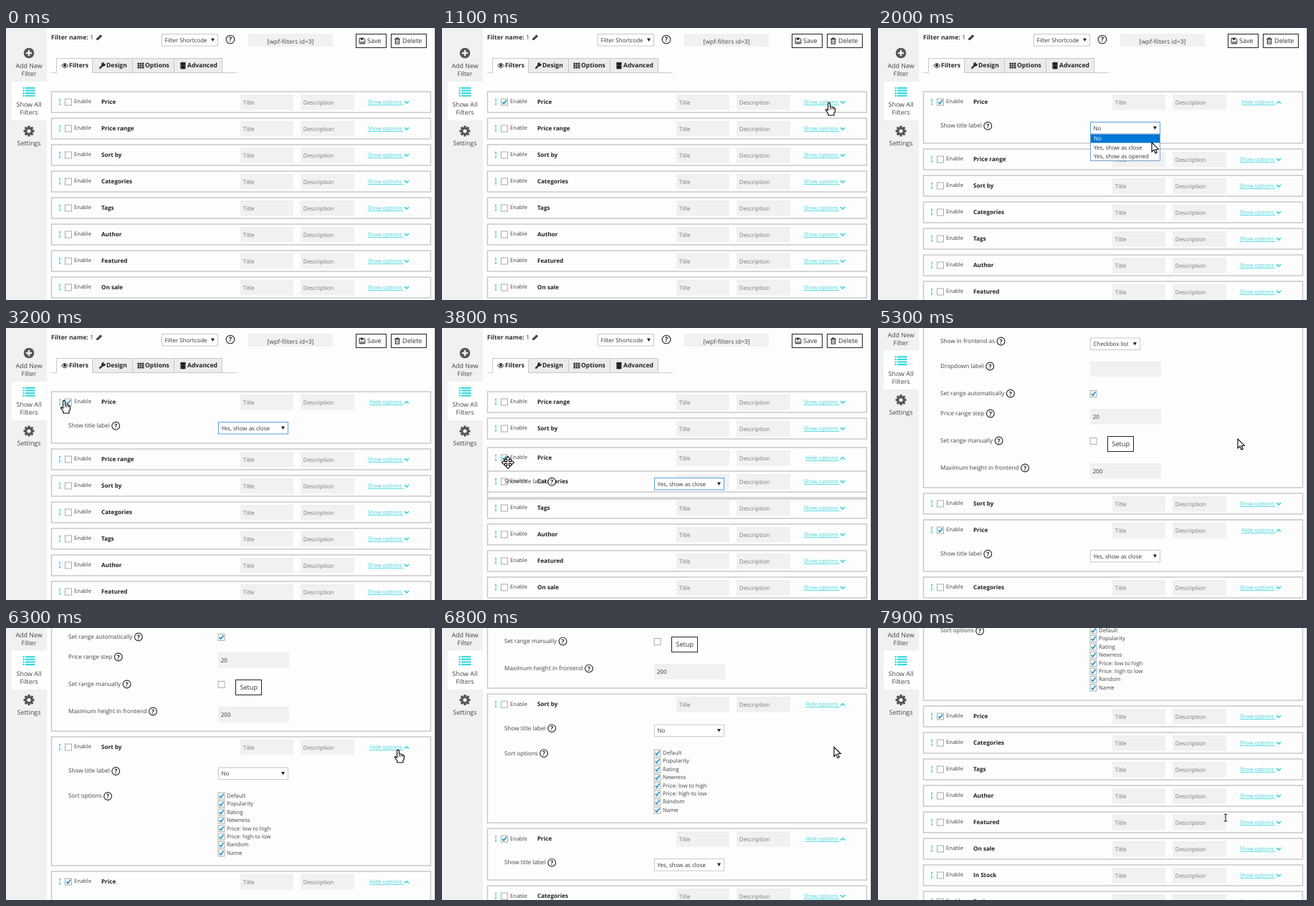
Write an HTML page with a canvas that moves like this. It is 600 px wide and 380 px high and loops after 8000 ms.

```html
<!DOCTYPE html>
<html>
<head>
<meta charset="utf-8">
<title>Filter settings</title>
<style>
  html, body { margin: 0; width: 100%; height: 100%; overflow: hidden; background: #fdfdfd; }
  canvas { display: block; width: 600px; height: 380px; }
</style>
</head>
<body>
<canvas id="stage" width="600" height="380"></canvas>
<script>
const ctx = document.getElementById('stage').getContext('2d');
ctx.textRendering = 'geometricPrecision';
const LOOP = 8000, STEP = 100, PITCH = 37, TOP = 103;
const CYAN = '#38d6dc', INK = '#444', DARK = '#222', FIELD = '#f1f1f1';
const NAMES = ['Price', 'Price range', 'Sort by', 'Categories', 'Tags', 'Author', 'Featured', 'On sale', 'In Stock', 'Rating'];
const SORTS = ['Default', 'Popularity', 'Rating', 'Newness', 'Price: low to high', 'Price: high to low', 'Random', 'Name'];
const PANEL = { 'Price': 43, 'Price range': 258, 'Sort by': 151 };

// Moments of the interaction, in ms
const AT = { check: 600, open: 1200, list: 1700, pick: 2400, grab: 3400, drop: 4300,
             range: 4800, sort: 5800, close: 7500 };
const SCROLL = [[4900, 0], [5200, 153], [6000, 153], [6200, 232], [6600, 232], [7200, 463]];
const POINTER = [
  [100, 300, 372, 'arrow'], [500, 87, 104, 'arrow'], [700, 87, 104, 'arrow'], [1100, 540, 104, 'hand'],
  [1300, 540, 104, 'arrow'], [1600, 383, 141, 'arrow'], [1800, 383, 148, 'arrow'], [2000, 382, 160, 'arrow'],
  [2300, 350, 167, 'arrow'], [2500, 330, 165, 'arrow'], [3000, 81, 101, 'hand'], [3200, 81, 101, 'hand'],
  [3400, 82, 110, 'move'], [3800, 92, 188, 'move'], [4300, 95, 188, 'arrow'], [4500, 118, 232, 'arrow'],
  [4600, 548, 106, 'hand'], [4900, 548, 106, 'arrow'], [5200, 502, 155, 'arrow'], [5500, 502, 155, 'arrow'],
  [5700, 547, 243, 'hand'], [6000, 547, 243, 'hand'], [6200, 547, 170, 'hand'], [6700, 547, 170, 'arrow'],
  [7300, 547, 121, 'hand'], [7700, 547, 121, 'arrow'], [7800, 520, 290, 'arrow'], [7900, 485, 265, 'beam']
];

function tween(keys, t, column = 1) {
  const i = keys.findIndex(k => k[0] > t);
  if (i === 0) return keys[0][column];
  if (i < 0) return keys[keys.length - 1][column];
  const a = keys[i - 1], b = keys[i];
  const p = (t - a[0]) / (b[0] - a[0]);
  return a[column] + (b[column] - a[column]) * p * p * (3 - 2 * p);
}

function rect(x, y, w, h, fill, stroke, width = 1) {
  if (fill) { ctx.fillStyle = fill; ctx.fillRect(x, y, w, h); }
  if (stroke) { ctx.strokeStyle = stroke; ctx.lineWidth = width; ctx.strokeRect(x + .5, y + .5, w - 1, h - 1); }
}

function text(s, x, y, size = 8.1, color = INK, weight = 400, align = 'left') {
  ctx.font = `${weight} ${size}px "Open Sans", sans-serif`;
  ctx.textAlign = align;
  ctx.fillStyle = color;
  ctx.fillText(s, x, y + size * .36);
  return ctx.measureText(s).width;
}

function shape(points, fill, stroke, width = 1) {
  ctx.beginPath();
  points.forEach(([x, y]) => ctx.lineTo(x, y));
  if (fill) { ctx.closePath(); ctx.fillStyle = fill; ctx.fill(); }
  if (stroke) { ctx.strokeStyle = stroke; ctx.lineWidth = width; ctx.stroke(); }
}

function disc(x, y, r, fill, stroke, width = 1) {
  ctx.beginPath();
  ctx.arc(x, y, r, 0, Math.PI * 2);
  if (fill) { ctx.fillStyle = fill; ctx.fill(); }
  if (stroke) { ctx.strokeStyle = stroke; ctx.lineWidth = width; ctx.stroke(); }
}

function place(x, y, draw) {
  ctx.save();
  ctx.translate(x, y);
  draw();
  ctx.restore();
}

const icons = {
  eye() {
    ctx.beginPath();
    ctx.moveTo(-4.5, 0);
    ctx.quadraticCurveTo(0, -6, 4.5, 0);
    ctx.quadraticCurveTo(0, 6, -4.5, 0);
    ctx.strokeStyle = DARK;
    ctx.lineWidth = 1;
    ctx.stroke();
    disc(0, -.3, 1.9, DARK);
  },
  wrench() {
    shape([[-3.5, 4], [1.5, -1]], null, DARK, 2.3);
    disc(2, -1.8, 2.7, DARK);
    shape([[1.8, -2], [3.5, -5.5], [5.5, -3]], '#ececec');
  },
  grid() {
    for (let i = 0; i < 9; i++) rect(-4.5 + i % 3 * 3.2, -3.8 + (i / 3 | 0) * 2.8, 2.6, 2.1, DARK);
  },
  database() {
    for (let i = 0; i < 4; i++) {
      ctx.beginPath();
      ctx.ellipse(0, -3.3 + i * 2.3, 4, 1.4, 0, 0, Math.PI * 2);
      ctx.fillStyle = DARK;
      ctx.fill();
    }
  },
  pencil() {
    shape([[-4, 4], [-3.3, 1.3], [1.8, -3.8], [4, -1.6], [-1.2, 3.4]], DARK);
    shape([[-2.2, 1.8], [2, -2.3]], null, '#fff', .6);
  },
  floppy() {
    shape([[-3.8, -3.8], [2.2, -3.8], [3.8, -2.2], [3.8, 3.8], [-3.8, 3.8], [-3.8, -3.8]], null, DARK);
    rect(-2, -3.8, 3.4, 2.4, DARK);
    rect(-2.4, 1, 4.8, 3, null, DARK, .8);
  },
  trash() {
    shape([[-3.8, -2.8], [3.8, -2.8]], null, DARK);
    rect(-1.7, -4.6, 3.4, 2.4, null, DARK, .9);
    rect(-3.2, -2.8, 6.4, 7.4, null, DARK);
    for (const x of [-1.2, 0, 1.2]) shape([[x, -.8], [x, 2.8]], null, DARK, .5);
  },
  gear() {
    for (let i = 0; i < 8; i++) {
      ctx.rotate(Math.PI / 4);
      rect(-1.6, -7.5, 3.2, 4, '#555');
    }
    disc(0, 0, 4.2, null, '#555', 3.2);
  },
  plus() {
    disc(0, 0, 7.3, '#555');
    rect(-4.2, -1.2, 8.4, 2.4, FIELD);
    rect(-1.2, -4.2, 2.4, 8.4, FIELD);
  },
  list() {
    for (let y = -6.5; y < 6; y += 3.6) {
      rect(-8.5, y, 2.4, 2.2, CYAN);
      rect(-5, y, 13.5, 2.2, CYAN);
    }
  }
};
const icon = (name, x, y) => place(x, y, icons[name]);

function help(x, y, r = 5.4) {
  disc(x, y, r, '#fff', DARK, 1.1);
  text('?', x, y, r * 1.6, DARK, 700, 'center');
}

function label(s, y) {
  const w = text(s, 87, y, 8.2);
  help(87 + w + 8.5, y + .5);
}

function checkbox(x, y, checked) {
  rect(x - 5, y - 5, 10, 10, '#fff', '#aaa');
  if (checked) shape([[x - 2.8, y], [x - .8, y + 2.3], [x + 3, y - 2.8]], null, '#1e8cbe', 1.6);
}

function select(x, y, w, value, focused) {
  rect(x, y - 8.5, w, 17.5, '#fff', focused ? '#5b9dd9' : '#c8c8c8');
  text(value, x + 4.5, y + .5, 8, '#333');
  shape([[x + w - 10, y - 2], [x + w - 5, y - 2], [x + w - 7.5, y + 2.5]], DARK);
}

function input(x, y, w, value = '', color = '#333') {
  rect(x, y - 10.5, w, 21, FIELD);
  rect(x, y - 10.5, w, 1, '#eaeaea');
  text(value, x + 3.8, y + .5, 8, color);
}

function button(x, y, w, h, s, name) {
  rect(x, y, w, h, '#fff', DARK);
  const cy = y + h / 2;
  if (name) icon(name, x + 9, cy);
  text(s, name ? x + 16 : x + 6.5, cy, 9.1, '#333');
}

function header() {
  const w = text('Filter name:', 63, 13, 8.6, '#333', 700);
  text('1', 63 + w + 2.5, 13, 8.6, '#333');
  icon('pencil', 130, 13);
  select(217, 16.5, 79, 'Filter Shortcode');
  help(313, 16, 5.8);
  rect(338, 8, 118, 18, FIELD);
  text('[wpf-filters id=3]', 397, 18.5, 8.5, INK, 400, 'center');
  button(488, 8, 43, 20, 'Save', 'floppy');
  button(537, 8, 50, 20, 'Delete', 'trash');
  rect(63, 62, 259, 1, '#ccc');
  const tabs = [['Filters', 70, 121, 'eye', 82], ['Design', 120, 177, 'wrench', 134],
                ['Options', 176, 235, 'grid', 188], ['Advanced', 234, 302, 'database', 247]];
  tabs.forEach(([name, x, end, glyph, gx], i) => {
    rect(x, 42, end - x, 21, i ? '#ececec' : '#fff', '#c8c8c8');
    if (!i) rect(x + 1, 62, end - x - 2, 1, '#fff');
    icon(glyph, gx, 52.5);
    text(name, gx + 6, 52.2, 8.6, DARK, 700);
  });
}

function sidebar(scroll) {
  rect(0, 0, 57, 380, FIELD);
  place(0, -Math.min(scroll, 43.5), () => {
    rect(8, 75, 49, 54, '#fff');
    icon('plus', 32, 35);
    icon('list', 32, 89.2);
    icon('gear', 32, 144);
    [['Add New', 53], ['Filter', 64], ['Show All', 107], ['Filters', 118], ['Settings', 161]]
      .forEach(([s, y]) => text(s, 32, y, 8.9, INK, 400, 'center'));
  });
}

const panels = {
  'Price'(y, t) {
    label('Show title label', y + 33.3);
    const focused = t >= AT.list && t < AT.range;
    select(296, y + 36.5, 98, t < AT.pick ? 'No' : 'Yes, show as close', focused);
  },
  'Price range'(y) {
    label('Show title label', y + 33);
    select(296, y + 36.5, 98, 'No');
    label('Show in frontend as', y + 68);
    select(296, y + 72, 70, 'Checkbox list');
    label('Dropdown label', y + 103);
    input(296, y + 107.5, 99);
    label('Set range automatically', y + 141);
    checkbox(300.5, y + 142, true);
    label('Price range step', y + 169);
    input(296, y + 174, 99, '20');
    label('Set range manually', y + 207);
    checkbox(300.5, y + 208, false);
    button(320, y + 201, 37, 22, 'Setup');
    label('Maximum height in frontend', y + 245);
    input(296, y + 250, 99, '200');
  },
  'Sort by'(y) {
    label('Show title label', y + 33.5);
    select(296, y + 37, 98, 'No');
    label('Sort options', y + 68.5);
    SORTS.forEach((s, i) => {
      const cy = y + 68 + i * 11.43;
      checkbox(300.5, cy + .5, true);
      text(s, 308, cy, 7.75);
    });
  }
};

function isOpen(name, t) {
  if (name === 'Price') return t >= AT.open && t < AT.close;
  if (name === 'Price range') return t >= AT.range;
  return name === 'Sort by' && t >= AT.sort;
}

function row(name, y, t) {
  const open = isOpen(name, t);
  rect(63, y - 14.5, 530, 30 + (open ? PANEL[name] : 0), null, '#c6c6c6', 1.4);
  shape([[75, y - 3.5], [75, y + 4]], null, CYAN, .9);
  shape([[73.4, y - 2.5], [75, y - 4.7], [76.6, y - 2.5]], CYAN);
  shape([[73.4, y + 3], [75, y + 5.2], [76.6, y + 3]], CYAN);
  checkbox(87, y + .5, name === 'Price' && t >= AT.check);
  text('Enable', 95, y - .3, 7.6);
  text(name, 133, y - .3, 8.15, DARK, 700);
  input(327, y + 1, 74, 'Title', '#777');
  input(411, y + 1, 75, 'Description', '#777');
  const w = text(open ? 'Hide options' : 'Show options', 552.5, y, 7.6, CYAN, 400, 'right');
  rect(552.5 - w, y + 4, w + 2, .8, CYAN);
  const d = open ? -1.7 : 1.7;
  shape([[556, y + .8 - d], [559, y + .8 + d * .7], [562, y + .8 - d]], null, CYAN, 1.7);
  if (open) panels[name](y, t);
}

function rows(t, scroll) {
  const order = NAMES.slice(1);
  const dragging = t >= AT.grab && t < AT.drop;
  const shift = tween(POINTER, t, 2) - 110;
  const slot = t < AT.grab ? 0 : dragging ? Math.max(0, Math.min(2, Math.round(shift / PITCH))) : 2;
  order.splice(slot, 0, 'Price');
  let y = TOP - scroll;
  for (const name of order) {
    const lifted = dragging && name === 'Price';
    if (!lifted) row(name, y, t);
    y += PITCH + (!lifted && isOpen(name, t) ? PANEL[name] : 0);
  }
  if (dragging) row('Price', TOP + shift, t);
}

function dropdown(t) {
  if (t < AT.list || t >= AT.pick) return;
  const chosen = tween(POINTER, t, 2) > 161 ? 1 : 0;
  rect(296, 148, 98, 38, '#fff', '#6f9fc8');
  rect(297, 149 + chosen * 12.3, 96, 11.5, '#0078d7');
  ['No', 'Yes, show as close', 'Yes, show as opened']
    .forEach((s, i) => text(s, 301, 154.5 + i * 12.3, 8, i === chosen ? '#fff' : '#333'));
}

const pointers = {
  arrow() {
    shape([[0, 0], [0, 13], [3, 10.2], [5, 15], [7.3, 14], [5.3, 9.4], [9.3, 9.2], [0, 0]], '#fff', '#000', 1.1);
  },
  hand() {
    shape([[-1.4, 1], [0, 0], [1.5, 1], [1.5, 6], [4, 6], [6.5, 7], [8.5, 8.2], [8.5, 13], [7, 15], [7, 18],
           [-1, 18], [-1.2, 15.5], [-4.5, 11], [-4, 9.5], [-1.4, 11], [-1.4, 1]], '#fff', '#000', 1.1);
    for (const x of [1.6, 4, 6.4]) shape([[x, 7], [x, 10]], null, '#000', .8);
  },
  move() {
    for (let i = 0; i < 4; i++) {
      shape([[-1.4, -1.4], [-1.4, -4.5], [-3.6, -4.5], [0, -8.5], [3.6, -4.5], [1.4, -4.5], [1.4, -1.4]], '#fff', '#000', 1.1);
      ctx.rotate(Math.PI / 2);
    }
    rect(-1.6, -1.6, 3.2, 3.2, '#fff');
  },
  beam() {
    shape([[0, -4.5], [0, 4.5]], null, DARK, 1.1);
    for (const y of [-4.8, 4.8]) shape([[-2.2, y], [2.2, y]], null, DARK, 1.1);
  }
};

function pointer(t) {
  if (t < POINTER[0][0]) return;
  const kind = POINTER.filter(k => k[0] <= t).pop()[3];
  place(tween(POINTER, t, 1), tween(POINTER, t, 2), pointers[kind]);
}

function frame(now) {
  const t = Math.floor(now % LOOP / STEP) * STEP;
  const scroll = tween(SCROLL, t);
  rect(0, 0, 600, 380, '#fdfdfd');
  place(0, -scroll, header);
  rows(t, scroll);
  sidebar(scroll);
  dropdown(t);
  rect(598.5, 0, 1.5, 380, DARK);
  pointer(t);
  requestAnimationFrame(frame);
}
requestAnimationFrame(frame);
</script>
</body>
</html>
```
